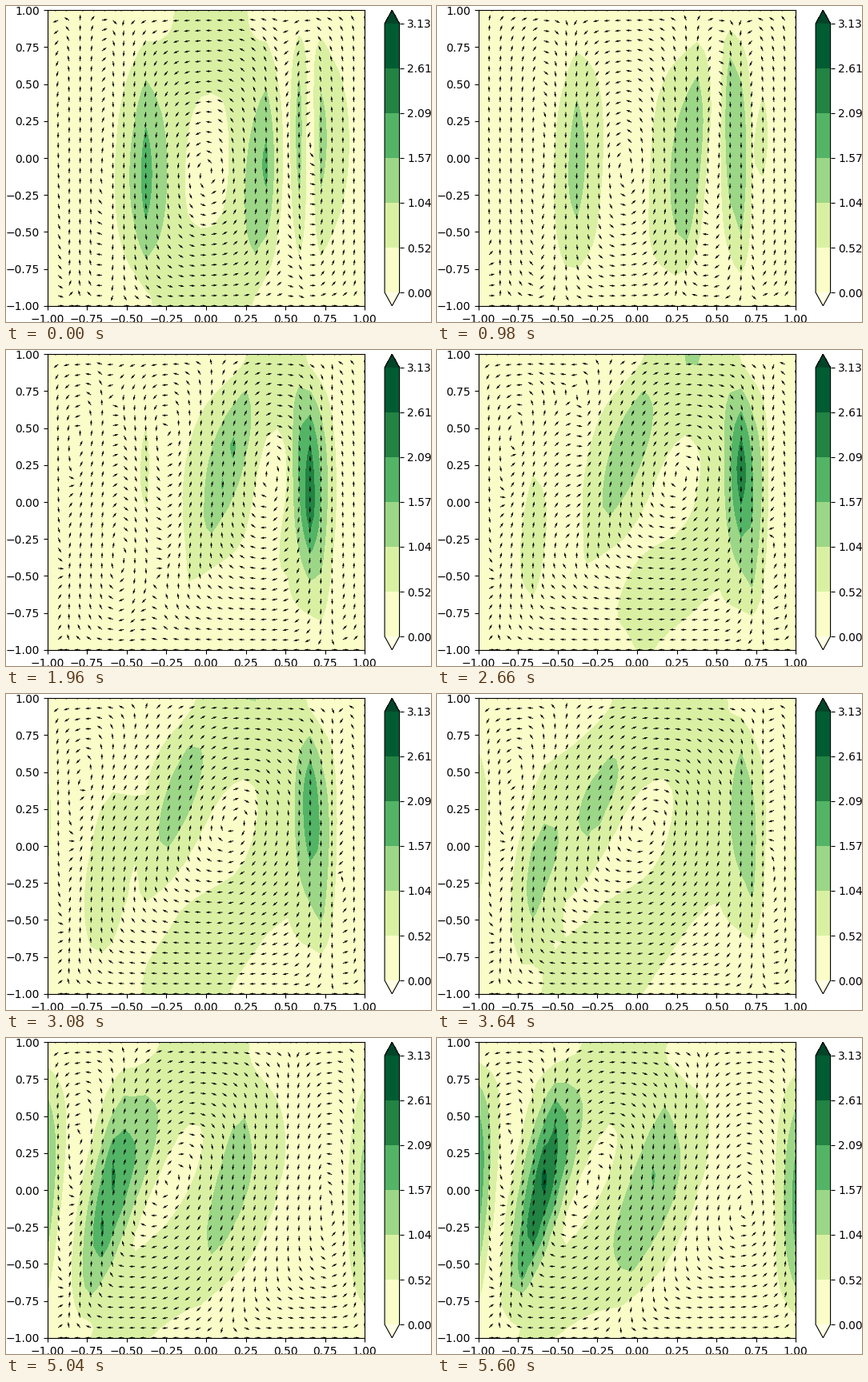
Write a matplotlib script that moves like this. It is 531 px wide and 395 px high and loops after 5740 ms.

```python
import numpy as np
import matplotlib.pyplot as plt
from matplotlib.animation import FuncAnimation

W, H, DPI = 531, 395, 100
FRAMES, INTERVAL = 41, 140
N, SUB = 30, 8                        # grid points per side, substeps in x
LEVELS = np.linspace(0, 3.132, 7)

plt.rcParams["font.family"] = "DejaVu Sans"


def ramp(s, a, b):
    return np.clip((s - a) / (b - a), 0, 1)


def ease(s, a, b):
    u = ramp(s, a, b)
    return u * u * (3 - 2 * u)


def jets(s):
    """Position, speed, tilt and north-south skew of each jet, west to east."""
    hump = np.sin(np.pi * s)
    turn = ease(s, .1, .45)
    return np.array([
        # western wall and the growing northward jet beside it
        (-1, -.15 - 1.75 * s**2.5, 0, -.12 * s),
        (-.69 + .09 * s, .35 + 2.5 * s**2.5, .19 * s**2, .22 * hump),
        # southward jet that reverses
        (-.38 - .07 * s, -.25 - 1.5 * np.cos(1.2 * np.pi * s),
         .2 * s, .1 - .4 * s),
        # central northward jet drifting west
        (.38 - .69 * ease(s, .12, .62), 1.7 * (1 - s**2),
         .05 + .3 * turn, .1 - .55 * turn + .15 * s**2),
        # southward return flow
        (.5 - .42 * s**1.5, -1.55 * ramp(s, .3, 1), .2 * s, -.2 * hump),
        (.55 - .17 * s**4, -.75 + .3 * s, .2 * s**4, -.12),
        # southward jet drifting east
        (.59 + .17 * s, -1.15 - 1.4 * np.cos(4.3 * (s - .34)),
         -.08 * hump, -.15),
        (.72 + .15 * ramp(s, 0, .4), 1.2 * np.exp(-5 * s) + .5 * s**4,
         0, -.12 * (1 - s)),
        # eastern wall
        (1, .1 + 1.7 * s**3, 0, .04 * s),
    ]).T


grid = np.linspace(-1, 1, N)
fine = np.linspace(-1, 1, (N - 1) * SUB + 1)
theta = np.pi * (grid + 1) / 2


def row_speed(pos, vel):
    """Northward speed along one row, slightly pointed at the jets."""
    idx = np.arange(len(pos))
    k = np.interp(fine, pos, idx)
    return np.interp(k + .04 * np.sin(2 * np.pi * k), idx, vel)


def flow(frame):
    x, v, tilt, skew = jets(frame / (FRAMES - 1))
    north = np.empty((N, len(fine)))
    for r, (y, th) in enumerate(zip(grid, theta)):
        lean = tilt * (y - .3 * y * y)
        pos = np.maximum.accumulate(np.clip(x + lean, -1, 1))
        north[r] = row_speed(pos, v * (np.sin(th) + skew * np.sin(2 * th)))
    # stream function, held at zero on every wall
    step = fine[1] - fine[0]
    psi = np.zeros_like(north)
    psi[:, 1:] = np.cumsum((north[:, 1:] + north[:, :-1]) * step / 2, axis=1)
    drift = psi[:, -1:].copy()
    psi -= drift * (fine + 1) / 2
    north -= drift / 2
    east = -np.gradient(psi, grid, axis=0, edge_order=2)
    return east[:, ::SUB], north[:, ::SUB]


def unit(u, v):
    size = np.maximum(np.hypot(u, v), 1e-9)
    return u / size, v / size


def place(left, width):
    return fig.add_axes([left / W, 20.2 / H, width / W, 369.6 / H])


def shade(u, v):
    return ax.contourf(grid, grid, np.hypot(u, v), levels=LEVELS,
                       cmap="YlGn", extend="both", zorder=0)


fig = plt.figure(figsize=(W / DPI, H / DPI), dpi=DPI, facecolor="white")
ax = place(51.5, 396.8)
cax = place(473.1, 18.48)
ticks = np.linspace(-1, 1, 9)
ax.set(xlim=(-1, 1), ylim=(-1, 1), xticks=ticks, yticks=ticks)

start = flow(0)
filled = shade(*start)
fig.colorbar(filled, cax=cax, format="%.2f")
arrows = ax.quiver(grid, grid, *unit(*start), scale=54, zorder=2)


def draw(frame):
    global filled
    u, v = flow(frame)
    filled.remove()
    filled = shade(u, v)
    arrows.set_UVC(*unit(u, v))
    return [arrows]


anim = FuncAnimation(fig, draw, frames=FRAMES, interval=INTERVAL,
                     repeat=True, repeat_delay=0, blit=False)
plt.show()
```
